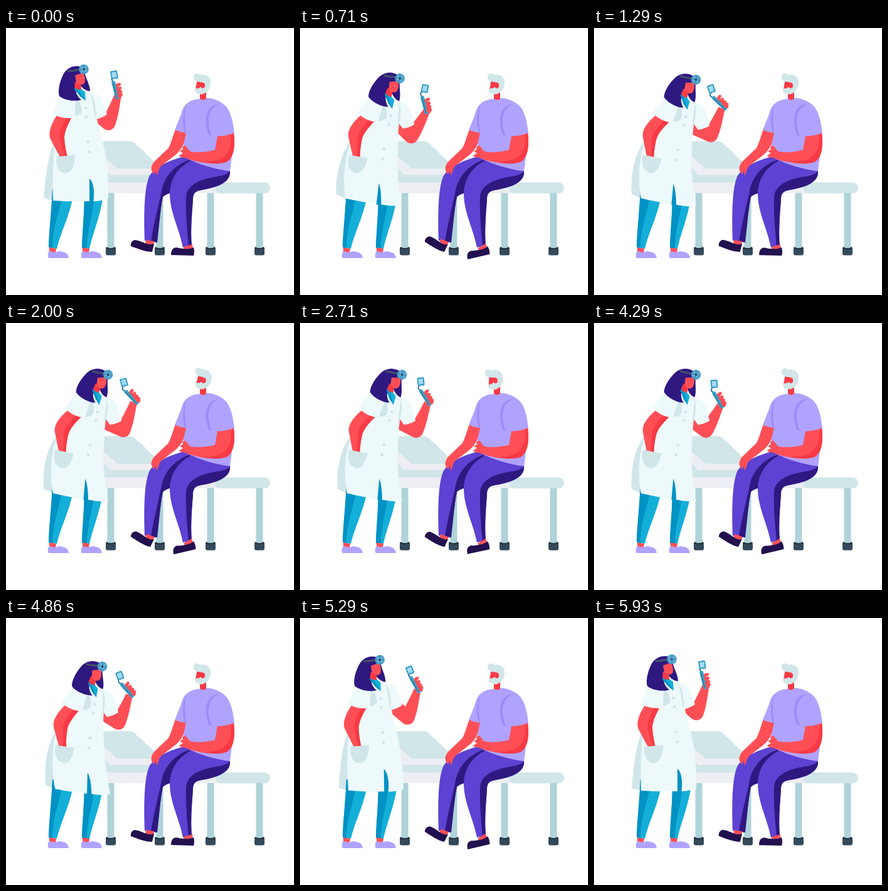
An HTML page for the animation above (6 s loop, 459 by 427 pixels).

```html
<!DOCTYPE html>
<html lang="en">
<head>
<meta charset="utf-8">
<title>Check-up</title>
<style>
  html, body { margin: 0; width: 100%; height: 100%; overflow: hidden; background: #fff; }
  svg { display: block; width: 100vw; height: 100vh; }
  .red { fill: #ff4f56; } .deep { fill: #f93a45; }
  .coat { fill: #edf9fa; } .mist { fill: #d1e6e9; } .pad { fill: #edeef3; }
  .aqua { fill: #14afd8; } .sea { fill: #0092c4; }
  .lilac { fill: #b0a3ff; } .violet { fill: #9d8bfa; }
  .pants { fill: #5d42d3; } .indigo { fill: #2f1880; } .shoe { fill: #22104f; }
</style>
</head>
<body>
<svg viewBox="0 0 459 427">
  <!-- bed -->
  <path class="mist" d="M140 181H198C206 182 207 187 211 190C215 192 219 196 223 201L242 219V247H140Z"/>
  <path class="pad" d="M148 199L178 225H238V235H166L148 216Z"/>
  <path class="pad" d="M145 247H345V264H145Z"/>
  <rect class="mist" x="333" y="247" width="88" height="17.500" rx="8.700"/>
  <g id="bedLegs"></g>

  <!-- patient -->
  <path class="pants" d="M285 205C262 211 236 222 228 238C219 260 220 310 221 340L240 343C243 318 246 290 250 270Q256 265 262 264L302 235V212Z"/>
  <path class="indigo" d="M292 211C266 220 252 240 248 260C243 285 236 310 231 341L241 343C244 318 246 290 250 270Q256 265 263 264L298 216Z"/>
  <path class="pants" d="M290 210C320 222 345 228 357 228C359 248 335 255 312 259C300 261 298 264 298 275C296 300 294 325 296 348L282 351C276 320 261 295 261 264C262 240 275 222 295 212Z"/>
  <path class="indigo" d="M357 228C359 248 335 255 312 259C300 261 298 266 298 275C296 300 294 325 296 348L291 350C289 325 286 300 287 270C289 247 318 240 340 237C350 235 355 232 357 228Z"/>
  <g id="farFoot">
    <path class="red" d="M223 339L236 341L235 348L222 346Z"/>
    <path class="shoe" d="M199 349C198 344 201 340 205 339C213 340 218 343 224 345Q230 347 236 345L233 358C222 358 210 353 199 349Z"/>
  </g>
  <g id="nearFoot">
    <path class="red" d="M283 350L297 346L298 354L284 355Z"/>
    <path class="shoe" d="M263 363C263 355 266 351 272 351Q278 353 285 353Q292 354 299 351Q301 357 299 364Z"/>
  </g>
  <path class="red" d="M270 162L288 166C286 182 280 195 270 203L248 220C243 224 244 231 240 236L239 228L236 234C230 228 230 222 236 214L259 192C264 182 266 172 270 162Z"/>
  <path class="lilac" d="M303 114C289 117 282 124 279 138L269 163Q278 167 287 168L282 190L284 206C305 218 335 226 357 229L360 205L352 172L364 168C362 150 358 130 347 122C338 115 328 112 320 112Z"/>
  <path class="violet" d="M288 121C283 132 279 148 285 168L287 168C285 150 284 136 288 121Z"/>
  <path class="violet" d="M340 122C316 122 315 152 324 172L328 172C319 152 321 128 340 122Z"/>
  <path class="red" d="M337 173Q351 173 363 168C366 192 362 208 352 214C335 221 300 214 287 208C281 206 277 207 276 204L282 200L277 197L282 194L281 190L286 188L293 197C305 200 322 198 333 195Z"/>
  <path class="deep" d="M363 168C366 192 362 208 352 214C343 218 327 217 314 214C338 214 361 209 359 170Z"/>
  <path class="deep" d="M309 102H319V113Q314 117 309 113Z"/>
  <g id="patientHead">
    <path class="deep" d="M305 82L302 98L308 103L319 99L320 84Z"/>
    <path class="mist" d="M299 77C300 71 307 72 310 75C318 73 327 78 326 88C326 95 323 100 318 104L317 92C318 87 313 87 306 86C300 84 298 81 299 77Z"/>
    <path class="mist" d="M301 98C304 95 307 98 310 94C313 98 316 97 319 91C322 100 318 106 311 106C304 106 301 103 301 98Z"/>
  </g>

  <!-- doctor -->
  <path class="mist" data-bend="M78 178C66 205 63 240 60 272L78 277L92 178Z"/>
  <path class="aqua" d="M74 258H108C105 295 89 320 81 353L68 351C69 320 72 300 74 258Z"/>
  <path class="sea" d="M74 258H92C84 300 74 320 74 352L68 351C69 320 72 300 74 258Z"/>
  <path class="aqua" d="M125 258H156C153 295 139 325 133 353L121 352C122 320 125 300 125 258Z"/>
  <path class="sea" d="M125 258H141C140 300 129 320 129 353L121 352C122 320 125 300 125 258Z"/>
  <g id="shoes"></g>
  <g id="arm" class="red">
    <path id="upperArm" stroke="#ff4f56" stroke-width="23" stroke-linecap="round" fill="none"/>
    <path id="forearm"/>
  </g>
  <g id="hand">
    <ellipse class="red" cx="3" cy="6" rx="5" ry="10"/>
    <path d="M-1 -13C-4 -17 -2 -20 2 -21" fill="none" stroke="#1f6f94" stroke-width="1.800"/>
    <g id="toolHead">
      <rect x="-5.500" y="-6.500" width="11" height="13" rx="1.500" fill="#2d95bf"/>
      <rect x="-3.800" y="-4.800" width="7.600" height="9.600" rx=".8" fill="#8fd3ee"/>
      <path d="M-3 -2H3M-3 1H2" stroke="#cdeefa" stroke-width="1"/>
    </g>
    <rect x="-4" y="-14" width="6" height="30" rx="2.500" fill="#3aa0c8"/>
    <path d="M-2 -11V13" stroke="#2680a8" stroke-width="1.300"/>
    <g id="fingers" class="red"></g>
  </g>
  <g class="upper">
    <path id="sleeve" class="coat" d="M126 103C138 102 148 106 152 113L161 138Q153 144 143 146L130 130Z"/>
  </g>
  <path class="coat" data-bend="M108 97L128 116L127 102C137 104 141 112 143 128C143 145 150 165 156 190C161 210 164 245 163 273Q148 278 133 277Q100 278 75 276C74 250 75 215 77 192L100 150Z"/>
  <path id="slit" class="sea"/>
  <g class="upper">
    <path class="mist" d="M134 104C141 112 144 128 143 146C140 135 139 118 134 104Z"/>
    <g class="mist">
      <circle cx="127" cy="128" r="2.300"/><circle cx="128" cy="142" r="2.300"/>
      <circle cx="131" cy="182" r="2.300"/><circle cx="133" cy="198" r="2.300"/>
    </g>
    <path class="red" d="M82 138C70 156 67 170 71 178L88 210L98 206C95 195 93 182 93 174C94 163 99 154 105 142Z"/>
    <path class="deep" d="M96 144C88 156 84 170 86 178L94 208L98 206C95 195 93 182 93 174C94 163 99 154 105 142Z"/>
    <path class="coat" d="M108 97C95 102 86 108 83 116L75 138C85 143 95 145 105 144L112 139L114 112Z"/>
    <path class="mist" d="M111 113L117 119C121 126 122 132 120 136Q116 140 110 141Z"/>
  </g>
  <path class="mist" data-bend="M80 206L110 203C110 220 104 232 95 232C85 232 79 222 80 206Z"/>
  <g id="doctorHead">
    <path class="indigo" d="M122 63C110 58 98 63 92 73C86 84 82 100 85 109C94 116 110 118 120 115C114 110 111 104 111 97L116 88C120 95 127 101 134 101C134 92 129 84 126 74Z"/>
    <path class="aqua" d="M110 95L119 97L126 102L127 116L118 109Z"/>
    <path class="sea" d="M108 97L112 95L127 116L118 109Z"/>
    <path class="deep" d="M110 86H119L120 98Q114 100 109 95Z"/>
    <path class="red" d="M110 76L123 71C126 78 127 84 125 88C122 92 115 91 112 87Z"/>
    <path d="M98 69Q108 69 118 66" fill="none" stroke="#44546a" stroke-width="3"/>
    <circle cx="124" cy="66" r="7.800" fill="#489dc8"/>
    <path d="M119 62L129 70M120 70L128 62" stroke="#86c6e4" stroke-width="1.200"/>
    <circle cx="124" cy="66" r="1.800" fill="#233a5c"/>
  </g>
</svg>
<script>
const LOOP = 6000, STEP = LOOP / 84;
const HIP = { x: 90, y: 198 }, LEAN_ANGLE = 17.2;
const $ = id => document.getElementById(id);
const clamp = v => Math.max(0, Math.min(1, v));
const mix = (a, b, k) => a + (b - a) * k;
const ease = p => (p = clamp(p), p < .5 ? 4 * p ** 3 : 1 - 4 * (1 - p) ** 3);

$('bedLegs').innerHTML = [167, 245, 326, 404].map(x => `
  <path d="M${x - 5.5} 264h11v88h-11z" fill="#aed3d9"/>
  <rect x="${x - 8}" y="350" width="16" height="13.500" rx="3" fill="#34495a"/>
  <ellipse cx="${x}" cy="351.500" rx="7.500" ry="2" fill="#1b2a38"/>
  <path d="M${x - 5.5} 348h11v3q-5.500 2 -11 0z" fill="#aed3d9"/>`).join('');
$('shoes').innerHTML = [0, 53].map(x => `<g transform="translate(${x})">
  <path class="red" d="M69 351L80 353L79 359H69Z"/>
  <path class="lilac" d="M67 367C66 360 68 357 71 357Q78 360 84 357C91 358 98 358 100 367L99 368H69Z"/></g>`).join('');
$('fingers').innerHTML = [-6, 0, 6, 11].map((y, i) =>
  `<ellipse cx="${5.5 - i * .5}" cy="${y}" rx="4.600" ry="2.600" transform="rotate(-8 5 ${y})"/>`).join('');

// time, elbow x y, grip x y, tool angle
const armKeys = [
  [0, 163, 152, 175, 98, -14],
  [710, 177, 173, 199, 122, -15],
  [1290, 186, 171, 200, 119, -47],
  [2710, 185, 172, 200, 118, -33],
  [3640, 176, 175, 201, 127, -16],
  [4860, 179, 167, 193, 114, -42],
  [5790, 163, 152, 175, 98, -14]
];
const headKeys = [[1750, 0], [2200, 8], [2700, -8], [3230, 0]];

// Smooth curve through the keys, at rest at both ends.
function sample(keys, t) {
  const last = keys.length - 1;
  t = Math.max(keys[0][0], Math.min(keys[last][0], t));
  let i = 0;
  while (i < last - 1 && t > keys[i + 1][0]) i++;
  const [a, b] = [keys[i], keys[i + 1]], span = b[0] - a[0], p = (t - a[0]) / span;
  const slope = (n, c) => n === 0 || n === last ? 0 :
    (keys[n + 1][c] - keys[n - 1][c]) / (keys[n + 1][0] - keys[n - 1][0]);
  return a.slice(1).map((v, j) => {
    const c = j + 1, q = 1 - p;
    return v * (1 + 2 * p) * q * q + b[c] * p * p * (3 - 2 * p)
      + span * (slope(i, c) * p * q * q - slope(i + 1, c) * p * p * q);
  });
}

const leanAt = t => ease(t / 1000) - ease((t - 4350) / 1285);

function rotate(x, y, degrees) {
  const r = degrees * Math.PI / 180, dx = x - HIP.x, dy = y - HIP.y;
  return [HIP.x + dx * Math.cos(r) - dy * Math.sin(r), HIP.y + dx * Math.sin(r) + dy * Math.cos(r)];
}

// The coat turns with the torso; its hem stays over the legs and swings.
function bend(path, lean, swing) {
  return path.replace(/(-?[\d.]+) (-?[\d.]+)/g, (_, sx, sy) => {
    const x = +sx, y = +sy, stiff = clamp((271 - y) / 66);
    const [rx, ry] = rotate(x, y, LEAN_ANGLE * lean);
    const hemX = x + swing, hemY = y + lean * .17 * (x - 97);
    return `${mix(hemX, rx, stiff).toFixed(2)} ${mix(hemY, ry, stiff).toFixed(2)}`;
  });
}

const turn = (el, a, x, y) => el.setAttribute('transform', `rotate(${a} ${x} ${y})`);
const bent = [...document.querySelectorAll('[data-bend]')];
const upper = [...document.querySelectorAll('.upper')];

function drawArm(t, lean) {
  const [ex, ey, gx, gy, tilt] = sample(armKeys, t);
  const [sx, sy] = rotate(150, 141, LEAN_ANGLE * lean);
  const wx = gx + 3, wy = gy + 9, len = Math.hypot(wx - ex, wy - ey);
  const ux = (wx - ex) / len, uy = (wy - ey) / len;
  const at = (along, side) => `${ex + ux * along - uy * side} ${ey + uy * along + ux * side}`;
  $('upperArm').setAttribute('d', `M${sx} ${sy}L${ex} ${ey}`);
  $('forearm').setAttribute('d', `M${at(0, -11)}C${at(len * .3, -9)} ${at(len * .7, -6)} ${at(len, -5)}
    L${at(len, 6)}C${at(len * .7, 8)} ${at(len * .35, 12)} ${at(0, 11.5)}Z`);
  $('hand').setAttribute('transform', `translate(${gx} ${gy}) rotate(${tilt})`);
  $('toolHead').setAttribute('transform',
    `translate(${mix(3, 7, lean)} ${mix(-23, -24.5, lean)}) rotate(${mix(4, 27, lean)})`);
}

function render(t) {
  const lean = leanAt(t), angle = LEAN_ANGLE * lean;
  const speed = (leanAt(t + 5) - leanAt(t - 5)) * 100;
  const swing = -4 * Math.tanh(speed * .8);
  bent.forEach(el => el.setAttribute('d', bend(el.dataset.bend, lean, swing)));
  const shift = 8 * lean;
  $('slit').setAttribute('d', bend(
    `M133 241C${139 - shift / 2} 245 ${142 - shift} 262 ${139 - shift} 279L${133 - shift * 1.2} 278Z`, lean, swing));
  upper.forEach(el => turn(el, angle, HIP.x, HIP.y));
  turn($('sleeve'), -13 * lean, 130, 105);
  $('doctorHead').setAttribute('transform',
    `rotate(${angle} ${HIP.x} ${HIP.y}) rotate(${2 * lean} 114 100)`);
  drawArm(t, lean);

  const tap = ease(Math.abs(Math.sin(Math.PI * t / 1200)));
  turn($('farFoot'), 13 * tap, 231, 345);
  turn($('nearFoot'), -15 * tap, 292, 350);
  turn($('patientHead'), sample(headKeys, t)[0], 314, 108);
}

function tick() {
  const t = performance.now() % LOOP;
  render(Math.floor((t + 5) / STEP) * STEP % LOOP);
  requestAnimationFrame(tick);
}
tick();
</script>
</body>
</html>
```
